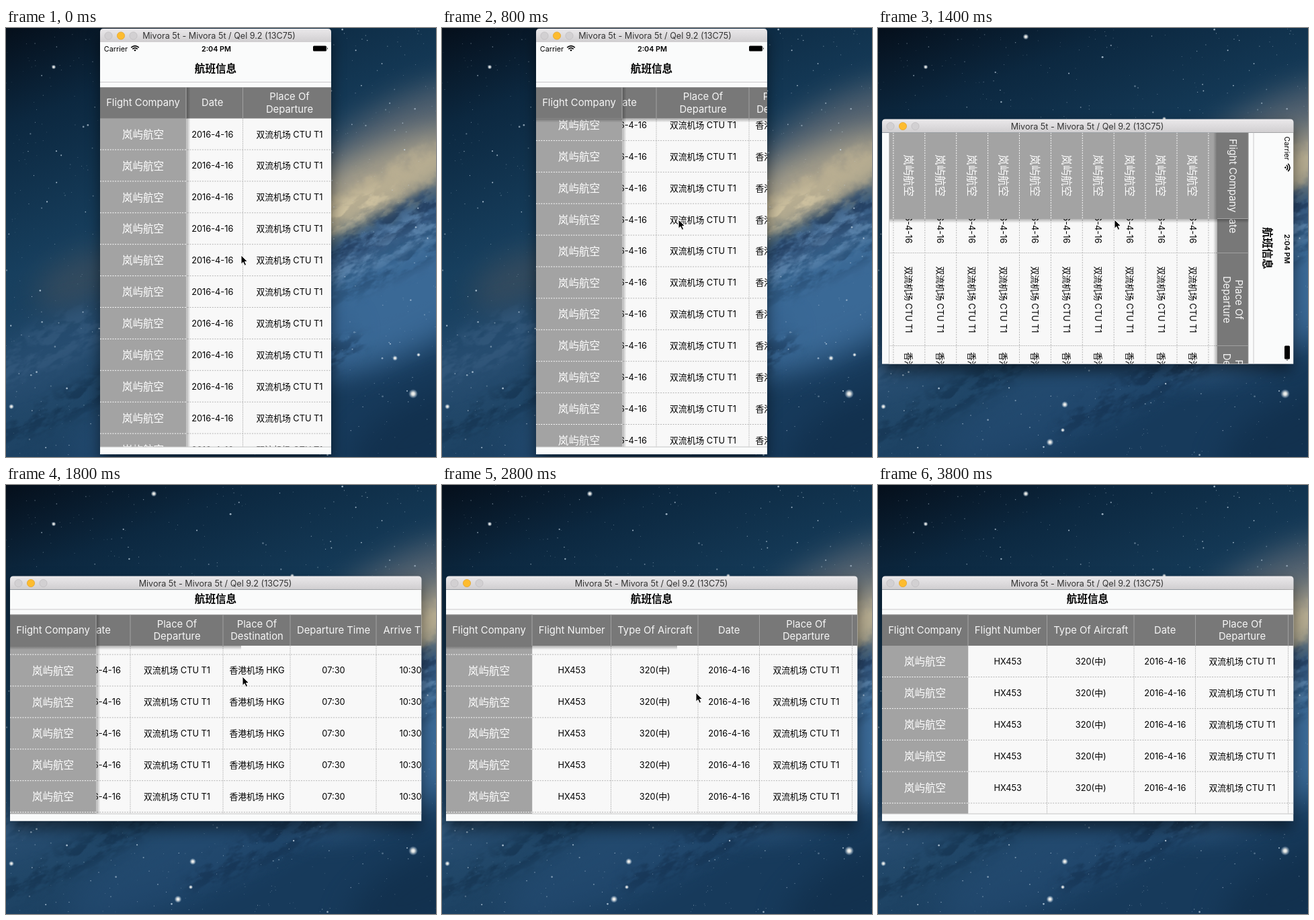
These frames come from a looping animation (640 by 638 pixels, 4000 ms). An HTML page:

```html
<!DOCTYPE html>
<html lang="zh-CN">
<head>
<meta charset="utf-8">
<title>航班信息</title>
<style>
html, body { margin: 0; width: 100%; height: 100%; overflow: hidden; background: #12304e; }
body > svg { position: absolute; left: 0; top: 0; width: 100%; height: 100%; display: block; }
#sky { will-change: transform; }
text { font-family: Inter, "Noto Sans CJK SC", "Noto Sans CJK", sans-serif; text-anchor: middle; }
.head { font-size: 14.8px; fill: #f6f6f6; }
.cell { font-size: 12.8px; fill: #000; }
.company { font-size: 15.6px; fill: #fff; }
</style>
</head>
<body>
<svg id="sky" viewBox="0 0 640 638" color-interpolation-filters="sRGB">
  <defs>
    <linearGradient id="night" x1="0" y1="0" x2=".4" y2="1">
      <stop offset="0" stop-color="#050f1b"/>
      <stop offset=".2" stop-color="#0c2840"/>
      <stop offset=".5" stop-color="#173f5e"/>
      <stop offset=".8" stop-color="#204667"/>
      <stop offset="1" stop-color="#173a5b"/>
    </linearGradient>
    <radialGradient id="halo">
      <stop offset="0" stop-color="#fff"/>
      <stop offset=".35" stop-color="#f4f4ee" stop-opacity=".85"/>
      <stop offset="1" stop-color="#b9d2ea" stop-opacity="0"/>
    </radialGradient>
    <filter id="soft" x="-100%" y="-150%" width="300%" height="400%"><feGaussianBlur stdDeviation="22"/></filter>
    <filter id="mist" x="-100%" y="-150%" width="300%" height="400%">
      <feGaussianBlur stdDeviation="9" result="shape"/>
      <feTurbulence type="fractalNoise" baseFrequency=".05" numOctaves="5" seed="4"/>
      <feDisplacementMap in="shape" scale="36" xChannelSelector="R" yChannelSelector="G"/>
    </filter>
    <filter id="dust" x="-100%" y="-150%" width="300%" height="400%">
      <feGaussianBlur stdDeviation="9" result="shape"/>
      <feTurbulence type="fractalNoise" baseFrequency=".03 .07" numOctaves="5" seed="9"/>
      <feColorMatrix values="0 0 0 0 0  0 0 0 0 0  0 0 0 0 0  6 0 0 0 -2.6" result="grain"/>
      <feComposite in="shape" in2="grain" operator="in"/>
    </filter>
  </defs>
  <rect width="640" height="638" fill="url(#night)"/>
  <g id="clouds"></g>
  <g id="stars"></g>
</svg>

<svg id="stage" viewBox="0 0 640 638">
  <defs>
    <linearGradient id="bar" x2="0" y2="1">
      <stop offset="0" stop-color="#ebe9eb"/><stop offset="1" stop-color="#d0ced0"/>
    </linearGradient>
    <linearGradient id="fadeRight">
      <stop offset="0" stop-color="#000" stop-opacity=".28"/><stop offset="1" stop-color="#000" stop-opacity="0"/>
    </linearGradient>
    <linearGradient id="fadeDown" x2="0" y2="1">
      <stop offset="0" stop-color="#000" stop-opacity=".3"/><stop offset="1" stop-color="#000" stop-opacity="0"/>
    </linearGradient>
    <filter id="drop" x="-30%" y="-30%" width="160%" height="160%"><feGaussianBlur stdDeviation="11"/></filter>
  </defs>
  <rect id="shadow" fill="#000" opacity=".55" filter="url(#drop)"/>
  <g id="window">
    <path id="frame" fill="url(#bar)"/>
    <g stroke-width=".7">
      <circle cx="12.5" cy="10.5" r="5.6" fill="#d2d0d2" stroke="#bdbbbd"/>
      <circle cx="31" cy="10.5" r="5.6" fill="#fdbc2f" stroke="#e0a028"/>
      <circle cx="49.5" cy="10.5" r="5.6" fill="#d2d0d2" stroke="#bdbbbd"/>
    </g>
    <text id="caption" y="15" font-size="12.6" fill="#333">Mivora 5t - Mivora 5t / Qel 9.2 (13C75)</text>
    <svg id="view" y="20">
      <g id="screen">
        <rect id="paper" fill="#fafbfb"/>
        <g id="status">
          <text x="23.5" y="13.5" font-size="10.8">Carrier</text>
          <g fill="none" stroke="#000" stroke-width="1.6">
            <path d="M46.2 8.2Q52 3 57.8 8.2M48.3 10.4Q52 7 55.7 10.4"/>
            <path d="M50.2 11.8Q52 10 53.8 11.8L52 13.7Z" fill="#000" stroke="none"/>
          </g>
          <text x="173" y="13.5" font-size="10.8" font-weight="600">2:04 PM</text>
          <rect x="317" y="5.5" width="20" height="8" rx="1.5"/>
          <path d="M338 8Q340 9.5 338 11Z"/>
        </g>
        <text id="title" font-size="15.6" font-weight="700">航班信息</text>
        <path id="navLine" stroke="#c9c9cb"/>
        <svg id="table">
          <rect width="100%" height="100%" fill="#f8f8f8"/>
          <svg x="128.5" y="46.5"><g id="cells"></g></svg>
          <rect id="sideShade" x="128.5" width="6" height="100%" fill="url(#fadeRight)"/>
          <svg y="46.5" width="128.5"><g id="companies"></g></svg>
          <rect id="downShade" y="46.5" width="344" height="6" fill="url(#fadeDown)"/>
          <rect width="100%" height="46.5" fill="#787878"/>
          <svg x="128.5" height="46.5"><g id="heads"></g></svg>
          <rect id="headShade" x="128.5" width="6" height="46.5" fill="url(#fadeRight)"/>
          <rect width="128.5" height="46.5" fill="#787878"/>
          <path d="M128 0V46.5" stroke="#a6a6a6"/>
          <text class="head" x="64" y="28.3">Flight Company</text>
          <path d="M0 .5H620" stroke="#a0a0a0" opacity=".6"/>
        </svg>
        <path id="tableEnd" stroke="#c4c4c4"/>
      </g>
    </svg>
  </g>
  <path id="cursor" d="M0 0V13.2L3.1 10.4L5.2 15.3L7.6 14.3L5.5 9.5H9.6Z" stroke="#fff" stroke-width="1" stroke-linejoin="round"/>
</svg>

<script>
const STEP = 200, STEPS = 20, ROW = 46.9, ROWS = 16, FIXED = 128.5, HEAD = 46.5;
const byId = id => document.getElementById(id);

function set(node, attrs) {
  for (const name in attrs) node.setAttribute(name, attrs[name]);
  return node;
}

function add(parent, tag, attrs, text) {
  const node = set(document.createElementNS("http://www.w3.org/2000/svg", tag), attrs);
  if (text) node.textContent = text;
  return parent.appendChild(node);
}

// Sky: cloud ellipses [x, y, rx, ry, color, opacity, filter], all tilted alike
const clouds = [
  [600, 175, 170, 70, "#77767a", .6, "soft"],
  [540, 238, 170, 48, "#b5aa90", .85, "soft"],
  [560, 240, 150, 24, "#c9bb97", .55, "mist"],
  [500, 280, 90, 16, "#e2d3ac", .6, "dust"],
  [590, 400, 200, 80, "#4273a3", .8, "soft"],
  [575, 304, 190, 22, "#3a5f88", .9, "mist"],
  [570, 322, 170, 26, "#6f98c0", .6, "dust"],
  [575, 290, 180, 18, "#1d3759", .75, "dust"],
  [600, 345, 150, 14, "#224468", .6, "dust"],
  [300, 540, 240, 60, "#2b5580", .4, "soft"],
  [110, 375, 70, 36, "#5c5a5c", .4, "soft"],
  [60, 490, 130, 50, "#30557b", .5, "soft"],
  [70, 470, 130, 34, "#44688c", .35, "dust"],
  [110, 550, 150, 22, "#102b46", .5, "dust"],
  [400, 530, 150, 26, "#112b48", .5, "dust"],
  [630, 600, 130, 55, "#0f2b46", .6, "soft"]
];
for (const [x, y, rx, ry, fill, opacity, filter] of clouds) {
  const tilt = add(byId("clouds"), "g", { transform: `translate(${x} ${y}) rotate(-27)` });
  add(tilt, "ellipse", { rx, ry, fill, opacity, filter: `url(#${filter})` });
}

let seed = 77;
const random = () => (seed = seed * 16807 % 2147483647) / 2147483647;
const star = (cx, cy, r, opacity, fill) =>
  add(byId("stars"), "circle", { cx, cy, r, opacity, fill });
for (let i = 0; i < 850; i++) {
  star(random() * 640, random() * 638, .4 + random() ** 5, .25 + random() * .55, "#cfe0ee");
}
const brightStars = [
  [606, 544, 7], [278, 560, 5], [256, 616, 5.5], [579, 491, 4], [220, 13, 4.5],
  [8, 563, 4], [71, 58, 3.5], [275, 598, 3.2], [614, 486, 3], [426, 135, 3.2]
];
for (const [x, y, r] of brightStars) star(x, y, r, 1, "url(#halo)");

// Table
const columns = [
  [117.5, "Flight Number", "HX453"],
  [129.5, "Type Of Aircraft", "320(中)"],
  [91.5, "Date", "2016-4-16"],
  [138, "Place Of|Departure", "双流机场 CTU T1"],
  [100, "Place Of|Destination", "香港机场 HKG"],
  [128, "Departure Time", "07:30"],
  [101, "Arrive Time", "10:30"]
];
const cells = byId("cells"), heads = byId("heads"), companies = byId("companies");
const rowList = Array.from({ length: ROWS }, (_, i) => i * ROW);

let left = 0;
for (const [width, label, value] of columns) {
  const x = left + width / 2, lines = label.split("|");
  lines.forEach((line, i) =>
    add(heads, "text", { class: "head", x, y: lines.length > 1 ? 19.2 + i * 18.3 : 28.3 }, line));
  for (const y of rowList) add(cells, "text", { class: "cell", x, y: y + 28 }, value);
  left += width;
  add(heads, "path", { d: `M${left - .5} 0V${HEAD}`, stroke: "#a0a0a0" });
  add(cells, "path", {
    d: `M${left - .5} 0V${ROWS * ROW}`, stroke: "#bcbcbc", "stroke-dasharray": "1.8 1"
  });
}
add(companies, "rect", { width: FIXED, height: ROWS * ROW, fill: "#a3a3a3" });
for (const y of rowList) {
  const lineY = y + ROW - .4;
  add(cells, "path", { d: `M0 ${lineY}H${left}`, stroke: "#b2b2b2", "stroke-dasharray": "1.9 1.8" });
  add(companies, "path", { d: `M0 ${lineY}H${FIXED}`, stroke: "#fff", "stroke-dasharray": "1.9 1.8" });
  add(companies, "text", { class: "company", x: 64, y: y + 29.2 }, "岚屿航空");
}

// Motion keys: [step, scrollX, scrollY, cursorX, cursorY]
const keys = [
  [0, 254, 0, 350, 338], [1, 271, 0, 350, 338], [2, 282, 0, 350, 336],
  [3, 287.5, 2, 351, 318], [4, 287.5, 13.6, 352, 285], [5, 287.5, 33.4, 352, 285],
  [9, 287.5, 33.4, 352, 285], [10, 287.5, 33.4, 348, 310], [12, 135, 33.4, 484, 323],
  [13, 22, 33.4, 440, 316], [14, 0, 33.4, 378, 309], [15, 0, 33.4, 376, 302],
  [16, 0, 14, 376, 325], [17, 0, 0, 376, 350], [19, 0, 0, 376, 350]
];
const WINDOW_TURN = 7, CONTENT_TURN = 8, CURSOR_GONE = 18;

function poseAt(step) {
  const next = Math.max(1, keys.findIndex(key => key[0] >= step));
  const a = keys[next - 1], b = keys[next];
  const mix = (step - a[0]) / (b[0] - a[0]);
  return a.map((value, i) => value + (b[i] - value) * mix);
}

function drawWindow(wide) {
  const [x, y, w, h] = wide ? [6, 135.5, 612.5, 344.3] : [140, 1, 344, 613];
  set(byId("window"), { transform: `translate(${x} ${y})` });
  set(byId("shadow"), { x: x + 1, y: y + 10, width: w - 2, height: h + 20 });
  set(byId("frame"), { d: `M0 20V5Q0 0 5 0H${w - 5}Q${w} 0 ${w} 5V20Z` });
  set(byId("caption"), { x: wide ? 305.5 : 177 });
  set(byId("view"), { width: w, height: h });
}

function drawScreen(wide, turned) {
  const [w, h, nav, tableH] = wide ? [612.5, 345, 29.5, 296.5] : [344.3, 613, 59.5, 535];
  const top = nav + 7.5;
  set(byId("screen"), { transform: turned ? "translate(612.5 0) rotate(90)" : "" });
  set(byId("paper"), { width: w, height: h });
  set(byId("status"), { visibility: wide ? "hidden" : "visible" });
  set(byId("title"), { x: wide ? 306 : 172, y: wide ? 19.6 : 44.6 });
  set(byId("navLine"), { d: `M0 ${nav}H${w}` });
  set(byId("table"), { y: top, width: w, height: tableH });
  set(byId("tableEnd"), { d: `M0 ${top + tableH}H${w}` });
}

function draw(time) {
  const step = Math.floor(time / STEP) % STEPS;
  const [, scrollX, scrollY, cursorX, cursorY] = poseAt(step);
  const wideWindow = step >= WINDOW_TURN, wideContent = step >= CONTENT_TURN;
  drawWindow(wideWindow);
  drawScreen(wideContent, wideWindow && !wideContent);
  set(cells, { transform: `translate(${-scrollX} ${-scrollY})` });
  set(heads, { transform: `translate(${-scrollX} 0)` });
  set(companies, { transform: `translate(0 ${-scrollY})` });
  for (const id of ["sideShade", "headShade"]) set(byId(id), { opacity: scrollX > 0 ? 1 : 0 });
  set(byId("downShade"), { opacity: scrollY > 0 ? 1 : 0 });
  set(byId("cursor"), {
    transform: `translate(${cursorX} ${cursorY})`,
    visibility: step >= CURSOR_GONE ? "hidden" : "visible"
  });
}

const start = performance.now();
function tick() {
  draw(performance.now() - start);
  requestAnimationFrame(tick);
}
tick();
</script>
</body>
</html>
```
